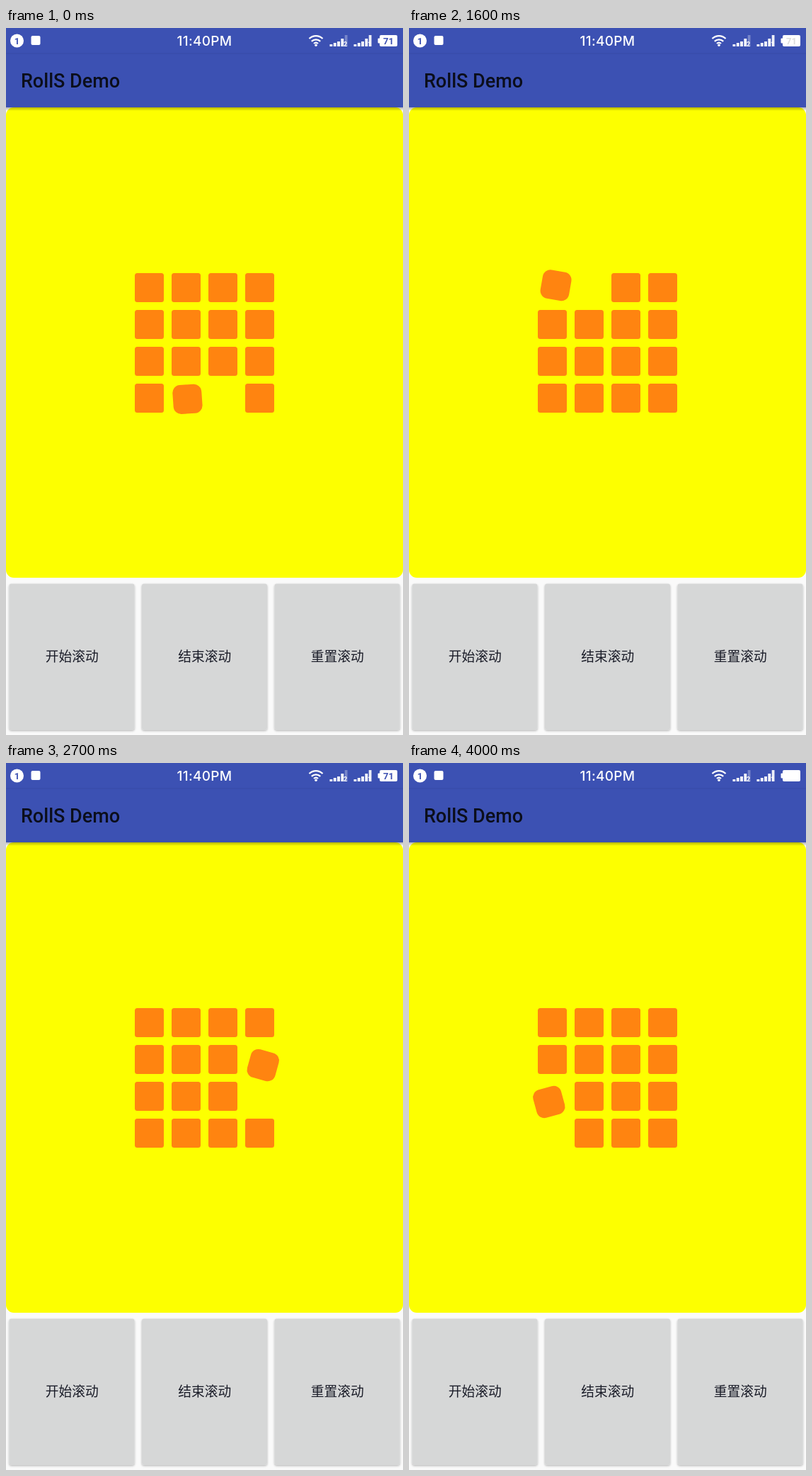
An HTML page that plays this animation: 561 by 998 pixels, repeating every 4.1 s.

```html
<!DOCTYPE html>
<html lang="zh">
<head>
<meta charset="utf-8">
<title>RollS Demo</title>
<style>
  html, body { margin: 0; width: 100%; height: 100%; overflow: hidden; background: #fafafa; }
  svg { display: block; width: 561px; height: 998px; }
  .clock { font: 500 19px Inter, sans-serif; letter-spacing: .3px; }
  .title { font: 500 27px Roboto, sans-serif; }
  .label { font: 18.75px "Noto Sans CJK SC", "Noto Sans CJK", sans-serif; fill: #1a1c28; }
  .small { font: 700 9px Roboto, sans-serif; }
  .badge { font: 700 13px Roboto, sans-serif; fill: #3c50b2; }
</style>
</head>
<body>
<svg viewBox="0 0 561 998">
  <defs>
    <linearGradient id="shade" x2="0" y2="1">
      <stop stop-opacity=".35"/>
      <stop offset="1" stop-opacity="0"/>
    </linearGradient>
    <filter id="drop" x="-5%" y="-5%" width="110%" height="110%">
      <feDropShadow dx="0" dy="1.5" stdDeviation="1.4" flood-opacity=".3"/>
    </filter>
  </defs>

  <rect y="112" width="561" height="664" rx="11" fill="#fdff00"/>
  <rect y="111" width="561" height="6" fill="url(#shade)"/>
  <rect width="561" height="112" fill="#3c51b3"/>
  <rect y="35.5" width="561" height="1" fill="#374ba8"/>
  <text class="title" x="21" y="84" fill="#0b0e1b">RollS Demo</text>

  <g id="status" fill="#fff">
    <circle cx="15.5" cy="18" r="9.5"/>
    <text class="badge" x="15.5" y="22.5" text-anchor="middle">1</text>
    <rect x="35.5" y="11" width="13" height="13" rx="2"/>
    <text class="clock" x="280.5" y="25" text-anchor="middle">11:40PM</text>
    <g fill="none" stroke="#fff" stroke-width="2.3">
      <path d="M428.5 15a13.5 13.5 0 0 1 19 0M431.8 18.8a9 9 0 0 1 12.4 0M435 22a4.5 4.5 0 0 1 6 0"/>
    </g>
    <circle cx="438" cy="24.3" r="1.8"/>
    <rect x="528" y="10" width="25" height="16" rx="2"/>
    <rect x="525.5" y="14.5" width="3" height="7" rx="1"/>
    <text id="charge" class="badge" x="540.5" y="22.8" text-anchor="middle">71</text>
  </g>
  <g id="tiles" fill="#ff8410"></g>
  <rect id="roller" width="41" height="41" rx="11" fill="#ff8410"/>
  <g id="buttons"></g>
</svg>
<script>
const $ = id => document.getElementById(id);
const SIZE = 41, GAP = 11, LEFT = 182, TOP = 346, LOOP = 4100;

function add(parent, tag, attrs, text = '') {
  const node = document.createElementNS('http://www.w3.org/2000/svg', tag);
  for (const key in attrs) node.setAttribute(key, attrs[key]);
  node.textContent = text;
  return parent.appendChild(node);
}

['开始滚动', '结束滚动', '重置滚动'].forEach((text, i) => {
  const x = 4.5 + i * 187.5;
  add($('buttons'), 'rect', { x, y: 784.5, width: 177, height: 206, rx: 3, fill: '#d6d7d7', filter: 'url(#drop)' });
  add($('buttons'), 'text', { class: 'label', x: x + 88.7, y: 894, 'text-anchor': 'middle' }, text);
});

function signal(x, name, lastOpacity) {
  [3, 5, 7, 11, 16].forEach((h, i) =>
    add($('status'), 'rect', { x: x + i * 5.3, y: 26 - h, width: 3.8, height: h, opacity: i < 4 ? 1 : lastOpacity }));
  add($('status'), 'text', { class: 'small', x: x + 19.5, y: 26 }, name);
}
signal(457.5, '2', .3);
signal(491.5, '1', .9);

const tiles = Array.from({ length: 16 }, (_, i) => add($('tiles'), 'rect', {
  x: LEFT + i % 4 * (SIZE + GAP), y: TOP + (i >> 2) * (SIZE + GAP), width: SIZE, height: SIZE, rx: 3.5
}));

// Outer cells, clockwise from the top left
const ring = [0, 1, 2, 3, 7, 11, 15, 14, 13, 12, 8, 4];
// Travel direction and pivot corner on each side
const sides = [
  { dx: 1, dy: 0, px: 1, py: 1 },
  { dx: 0, dy: 1, px: 0, py: 1 },
  { dx: -1, dy: 0, px: 0, py: 0 },
  { dx: 0, dy: -1, px: 1, py: 0 }
];
// [ms, cells travelled]
const pace = [[0, 7.79], [1000, 10.14], [1600, 12.057], [2100, 14.197],
  [2700, 16.09], [3200, 18.337], [4000, 21.588], [4100, 21.95]];

function travelled(ms) {
  const i = pace.findIndex(p => p[0] > ms);
  const [t0, a] = pace[i - 1], [t1, b] = pace[i];
  return a + (b - a) * (ms - t0) / (t1 - t0);
}

function draw(ms) {
  const dist = travelled(ms), step = Math.floor(dist) % 12;
  const turn = 1 - (1 - dist % 1) ** 2;
  const from = ring[step], to = ring[(step + 1) % 12];
  tiles.forEach((tile, i) => tile.setAttribute('visibility', i === from || i === to ? 'hidden' : 'visible'));

  const { dx, dy, px, py } = sides[Math.floor(step / 3)];
  const x = LEFT + from % 4 * (SIZE + GAP) + dx * GAP * turn;
  const y = TOP + (from >> 2) * (SIZE + GAP) + dy * GAP * turn;
  $('roller').setAttribute('transform',
    `translate(${x} ${y}) rotate(${turn * 90} ${px * SIZE} ${py * SIZE})`);

  const faint = ms >= 700 && ms < 1900;
  $('charge').style.fill = faint ? '#dcdcdc' : '#3c50b2';
  $('charge').style.opacity = ms < 3700 ? 1 : 0;
}

function tick() {
  draw(Math.floor(performance.now() % LOOP / 100) * 100);
  requestAnimationFrame(tick);
}
tick();
</script>
</body>
</html>
```
